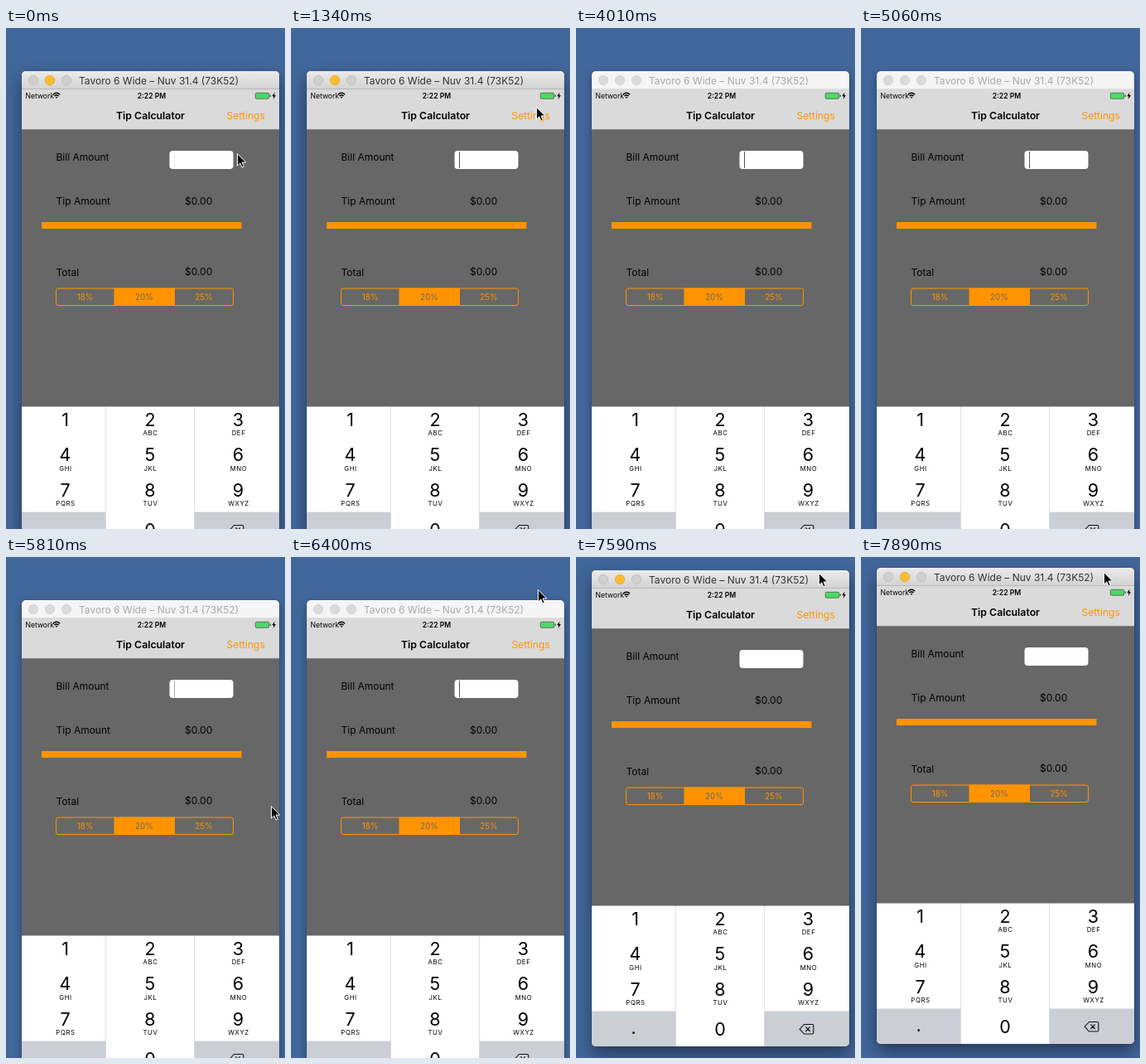
These frames come from a looping animation (337x604 px, 8000 ms). An HTML page:

```html
<!DOCTYPE html>
<html lang="en">
<head>
<meta charset="utf-8">
<title>Tip Calculator</title>
<style>
  html, body { margin: 0; width: 100%; height: 100%; overflow: hidden; }
  body { position: relative; background: #42679b; }
  #window {
    position: absolute; left: 19px; top: 52px; width: 311px; height: 574px;
    border-radius: 5px; background: #676767;
  }
  #window svg { display: block; border-radius: 5px; }
  #cursor { position: absolute; left: 0; top: 0; overflow: visible; }
  text { font-family: Inter, Roboto, sans-serif; font-size: 12px; }
  .mid { text-anchor: middle; }
  .bold { font-weight: 600; }
  .status { font-size: 8.6px; }
  .segment { font-size: 9.8px; }
  .digit { font-size: 21.5px; }
  .letters { font-size: 7.8px; letter-spacing: .6px; }
  .orange { fill: #ff9400; }
</style>
</head>
<body>
<div id="window">
  <svg width="311" height="574" viewBox="19 52 311 574">
    <defs>
      <linearGradient id="metal" x2="0" y2="1">
        <stop stop-color="#ebebeb"/><stop offset="1" stop-color="#d2d2d2"/>
      </linearGradient>
    </defs>

    <g id="idle"></g>
    <g id="active"></g>

    <rect x="19" y="74" width="311" height="48" fill="#dadada"/>
    <path d="M19 122.3H330" stroke="#a5a5a5" stroke-width=".6"/>
    <text class="status" x="23.5" y="85">Network</text>
    <g fill="none" stroke="#000" stroke-width="1.3">
      <path d="M56.8 80.2Q61 76.4 65.2 80.2M58.4 82.1Q61 79.8 63.6 82.1"/>
      <path d="M60 83.4H62L61 84.6Z" stroke-width=".8"/>
    </g>
    <text class="status bold mid" x="176" y="85">2:22 PM</text>
    <rect x="301.3" y="78.3" width="16.4" height="7" rx="1.3" fill="#4cd964" stroke="#333" stroke-width=".6"/>
    <path d="M319.2 80.5V83" stroke="#333"/>
    <path d="M324.6 77.5L321.3 82.2H323.4L322.7 86L326 81.1H323.9Z"/>
    <text class="bold mid" x="174.5" y="110" style="font-size:12.3px">Tip Calculator</text>
    <text class="orange" x="266.5" y="110">Settings</text>

    <text x="60.5" y="160">Bill Amount</text>
    <rect x="197.5" y="148" width="77" height="22" rx="4" fill="#fff"/>
    <rect id="caret" x="203" y="149" width="1" height="20" fill="#555"/>
    <text x="60.5" y="213">Tip Amount</text>
    <text x="216" y="213">$0.00</text>
    <rect class="orange" x="43" y="234" width="241.5" height="8"/>
    <text x="60.5" y="299">Total</text>
    <text x="216" y="298">$0.00</text>

    <rect x="60.5" y="314" width="214" height="20.5" rx="2.5" fill="none" stroke="#ff9400"/>
    <rect class="orange" x="130.5" y="313.5" width="73.5" height="21.5"/>
    <text class="segment orange mid" x="95.5" y="328">18%</text>
    <text class="segment mid" x="167" y="328" fill="#676767">20%</text>
    <text class="segment orange mid" x="239" y="328">25%</text>

    <rect x="19" y="456.5" width="311" height="170" fill="#fff"/>
    <path d="M19 583.5H120.5V626H19ZM227.5 583.5H330V626H227.5Z" fill="#cbced5"/>
    <path d="M120.5 457V626M227.5 457V626" stroke="#d5d6d9" stroke-width=".7"/>
    <g id="keys"></g>
    <path d="M275.5 599.5H285.5Q286.8 599.5 286.8 601V609.5Q286.8 611 285.5 611H275.5L270.2 605.2ZM277.3 602.4L282.8 608M282.8 602.4L277.3 608" fill="none" stroke="#111" stroke-width="1.1"/>
  </svg>
</div>
<svg id="cursor" width="14" height="20">
  <path d="M.5 .5V15L3.8 11.9L6 17L8.3 16L6.1 11H10.7Z" fill="#000" stroke="#fff" stroke-width="1"/>
</svg>

<script>
const LOOP = 8000;
const byId = id => document.getElementById(id);

function titleBar(fill, line, ink, lights) {
  const dots = lights.map(([color, rim], i) =>
    `<circle cx="${33 + 20 * i}" cy="63" r="5.7" fill="${color}" stroke="${rim}" stroke-width=".7"/>`);
  return `<rect x="19" y="52" width="311" height="22" fill="${fill}"/>
    <path d="M19 73.6H330" stroke="${line}" stroke-width=".8"/>${dots.join('')}
    <text x="88" y="67.6" fill="${ink}">Tavoro 6 Wide – Nuv 31.4 (73K52)</text>`;
}

const pale = ['#dadada', '#cecece'];
const grey = ['#cfcfcf', '#b8b8b8'];
const amber = ['#fdbc2e', '#dfa023'];
byId('idle').innerHTML = titleBar('#f5f5f5', '#d8d8d8', '#a8a8a8', [pale, pale, pale]);
byId('active').innerHTML = titleBar('url(#metal)', '#b0b0b0', '#303030', [grey, amber, grey]);

const columns = [71.5, 174, 280.5];
const letters = ['', 'ABC', 'DEF', 'GHI', 'JKL', 'MNO', 'PQRS', 'TUV', 'WXYZ'];
const key = (x, y, digit, label = '') =>
  `<text class="digit mid" x="${x}" y="${y}">${digit}</text>
   <text class="letters mid" x="${x + .5}" y="${y + 11.3}">${label}</text>`;
byId('keys').innerHTML = letters.map((label, i) =>
  key(columns[i % 3], 480 + 42.3 * Math.floor(i / 3), i + 1, label)).join('')
  + key(174, 613, 0) + key(69.5, 611, '.');

// Each step is [start in ms, value], held until the next one.
function play(id, property, steps, format = v => v) {
  const frames = steps.map(([time, value]) =>
    ({ offset: time / LOOP, [property]: format(value), easing: 'step-end' }));
  frames.push({ ...frames[frames.length - 1], offset: 1 });
  byId(id).animate(frames, { duration: LOOP, iterations: Infinity });
}

const focus = [[0, 1], [3270, 0], [7290, 1]];
play('active', 'opacity', focus);
play('window', 'boxShadow', focus, on => on
  ? '0 9px 20px rgba(0,0,0,.45), 0 0 1px rgba(0,0,0,.5)'
  : '0 4px 11px rgba(0,0,0,.32), 0 0 1px rgba(0,0,0,.4)');
play('window', 'transform', [[0, 0], [7590, -36], [7740, -39]], y => `translateY(${y}px)`);

play('caret', 'opacity', [
  [0, .15], [150, .6], [300, 1], [590, .5], [740, 0], [1040, .5], [1190, 1],
  [1490, .5], [1640, 0], [1930, .5], [2080, 1], [2370, .8], [2520, .55], [2670, 0],
  [2970, .5], [3120, 1], [3410, .5], [3560, 0], [4010, 1], [4310, .5], [4460, 0],
  [4760, .5], [4910, .8], [5060, 1], [5510, 0], [5810, .5], [5960, 1], [6540, 0],
  [6840, .5], [6990, 1], [7290, .5], [7440, .15], [7590, 0]
]);

const away = [400, 700];
play('cursor', 'transform', [
  [0, [279, 151]], [150, [282, 138]], [300, [282, 131]],
  [1040, [281, 112]], [1190, [285, 94]], [1340, [296, 95]], [1490, [304, 122]],
  [1640, [318, 190]], [1780, [326, 300]], [1930, [327, 430]], [2080, [322, 536]],
  [2220, [320, 592]], [2370, away],
  [4460, [326, 575]], [4610, [329, 560]], [4760, [330, 590]], [4910, away],
  [5510, [326, 560]], [5660, [325, 450]], [5810, [320, 300]], [5960, [312, 160]],
  [6100, [302, 70]], [6250, [297, 33]], [6400, [298, 39]], [6540, [298, 42]],
  [6690, [297, 47]], [6840, [295, 55]], [6990, [293, 58]],
  [7440, [293, 22]], [7590, [293, 19]], [7890, [293, 18]]
], ([x, y]) => `translate(${x}px, ${y}px)`);
</script>
</body>
</html>
```
